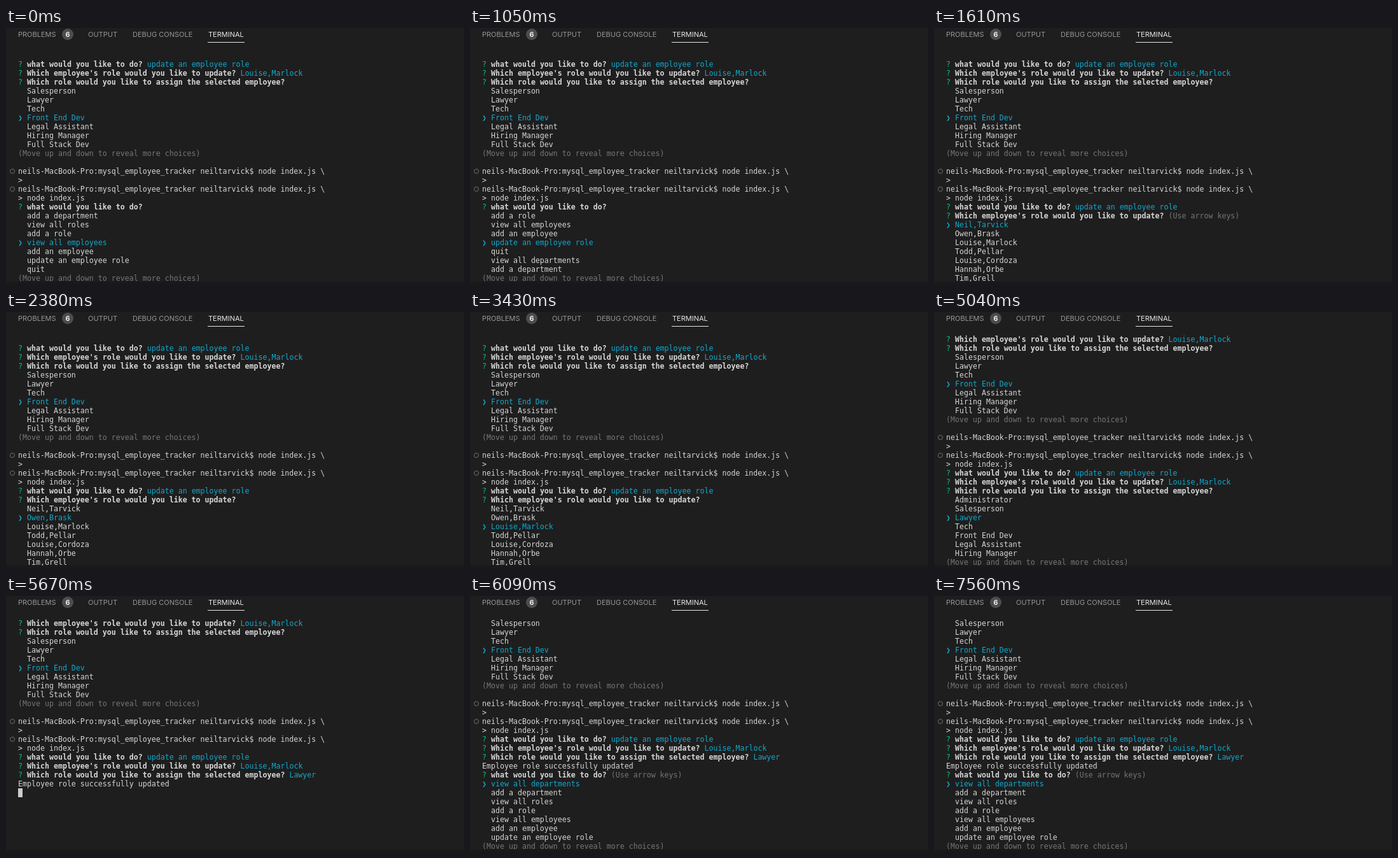
Write an HTML page that moves like this. It is 720 by 402 pixels and loops after 7630 ms.

```html
<!DOCTYPE html>
<html lang="en">
<head>
<meta charset="utf-8">
<title>Employee tracker terminal</title>
<style>
  html, body { margin: 0; width: 100%; height: 100%; overflow: hidden; background: #1e1e1e; }
  #stage { position: relative; width: 720px; height: 402px; overflow: hidden; background: #1e1e1e; }
  #stage::after { content: ""; position: absolute; left: 0; right: 0; bottom: 0; height: 4px; background: #191919; }
  .tab { position: absolute; top: 3px; font: 11px/14px Inter, sans-serif; color: #969696; white-space: pre; }
  .tab.on { color: #e7e7e7; }
  .tab.on::after { content: ""; position: absolute; left: -1px; right: -1px; top: 19px; height: 1px; background: #e7e7e7; }
  #badge { position: absolute; left: 88px; top: 1px; width: 18px; height: 18px; border-radius: 50%;
    background: #4d4d4d; color: #fff; font: 600 11px/18px Inter, sans-serif; text-align: center; }
  #term { position: absolute; left: 19px; top: 36px; font: 11.627px/14px "DejaVu Sans Mono", monospace; color: #d6d6d6; }
  .row { position: relative; height: 14px; white-space: pre; }
  .green { color: #0dbc79; }
  .cyan { color: #11a8cd; }
  .dim { color: #767676; }
  .prompt::before { content: ""; position: absolute; left: -13px; top: 3px; width: 6px; height: 6px;
    border: 1px solid #707070; border-radius: 50%; }
  .cursor { display: inline-block; width: 7px; height: 14px; background: #ccc; vertical-align: top; }
</style>
</head>
<body>
<div id="stage">
  <div class="tab" style="left:19px">PROBLEMS</div>
  <div id="badge">6</div>
  <div class="tab" style="left:129px">OUTPUT</div>
  <div class="tab" style="left:199px">DEBUG CONSOLE</div>
  <div class="tab on" style="left:318px">TERMINAL</div>
  <div id="term"></div>
</div>
<script>
const LOOP = 7630, PAGE = 7, MIDDLE = 3;

const actions = ["view all departments", "add a department", "view all roles", "add a role",
  "view all employees", "add an employee", "update an employee role", "quit"];
const employees = ["Neil,Tarvick", "Owen,Brask", "Louise,Marlock", "Todd,Pellar",
  "Louise,Cordoza", "Hannah,Orbe", "Tim,Grell"];
const roles = ["Administrator", "Salesperson", "Lawyer", "Tech", "Front End Dev",
  "Legal Assistant", "Hiring Manager", "Full Stack Dev"];

const row = (html, cls = "") => `<div class="row ${cls}">${html}</div>`;
const span = (cls, text) => `<span class="${cls}">${text}</span>`;
const ask = (question, tail = "") => row(`${span("green", "?")} <b>${question}</b> ${tail}`);
const keys = span("dim", "(Use arrow keys)");

// One page of a list that wraps around once the pointer passes the middle.
function choices(list, pick) {
  const first = Math.max(0, pick - MIDDLE);
  const rows = Array.from({ length: PAGE }, (_, i) => {
    const at = first + i, text = list[at % list.length];
    return row(at === pick ? span("cyan", "❯ " + text) : "  " + text);
  });
  if (list.length > PAGE) rows.push(row(span("dim", "(Move up and down to reveal more choices)")));
  return rows;
}

const askAction = tail => ask("what would you like to do?", tail);
const askEmployee = tail => ask("Which employee's role would you like to update?", tail);
const askRole = tail => ask("Which role would you like to assign the selected employee?", tail);

const didAction = askAction(span("cyan", actions[6]));
const didEmployee = askEmployee(span("cyan", employees[2]));
const didRole = askRole(span("cyan", roles[2]));
const shell = row("neils-MacBook-Pro:mysql_employee_tracker neiltarvick$ node index.js \\", "prompt");

const history = [
  row(""), didAction, didEmployee, askRole(), ...choices(roles, 4), row(""),
  shell, row("&gt;"), shell, row("&gt; node index.js")
];

const view = (skip, ...rows) => [...history, ...rows].slice(skip).join("");
const actionView = pick => view(0, askAction(), ...choices(actions, pick));
const employeeView = (pick, tail) => view(0, didAction, askEmployee(tail), ...choices(employees, pick));
const roleView = (pick, tail) => view(2, didAction, didEmployee, askRole(tail), ...choices(roles, pick));
const finished = [didAction, didEmployee, didRole, row("Employee role successfully updated")];

// Start time in ms and screen content.
const steps = [
  [0, actionView(4)],
  [420, actionView(5)],
  [1050, actionView(6)],
  [1540, employeeView(0, keys)],
  [2380, employeeView(1)],
  [2660, employeeView(2)],
  [4130, roleView(0, keys)],
  [4760, roleView(1)],
  [5040, roleView(2)],
  [5670, view(2, ...finished, row(span("cursor", "")))],
  [5740, view(4, ...finished, askAction(keys), ...choices(actions, 0))]
];

const term = document.getElementById("term");
const start = performance.now();
let shown = -1;

function draw() {
  const t = (performance.now() - start) % LOOP;
  const now = steps.findLastIndex(([from]) => t >= from);
  if (now !== shown) {
    term.innerHTML = steps[now][1];
    shown = now;
  }
  requestAnimationFrame(draw);
}
draw();
</script>
</body>
</html>
```
